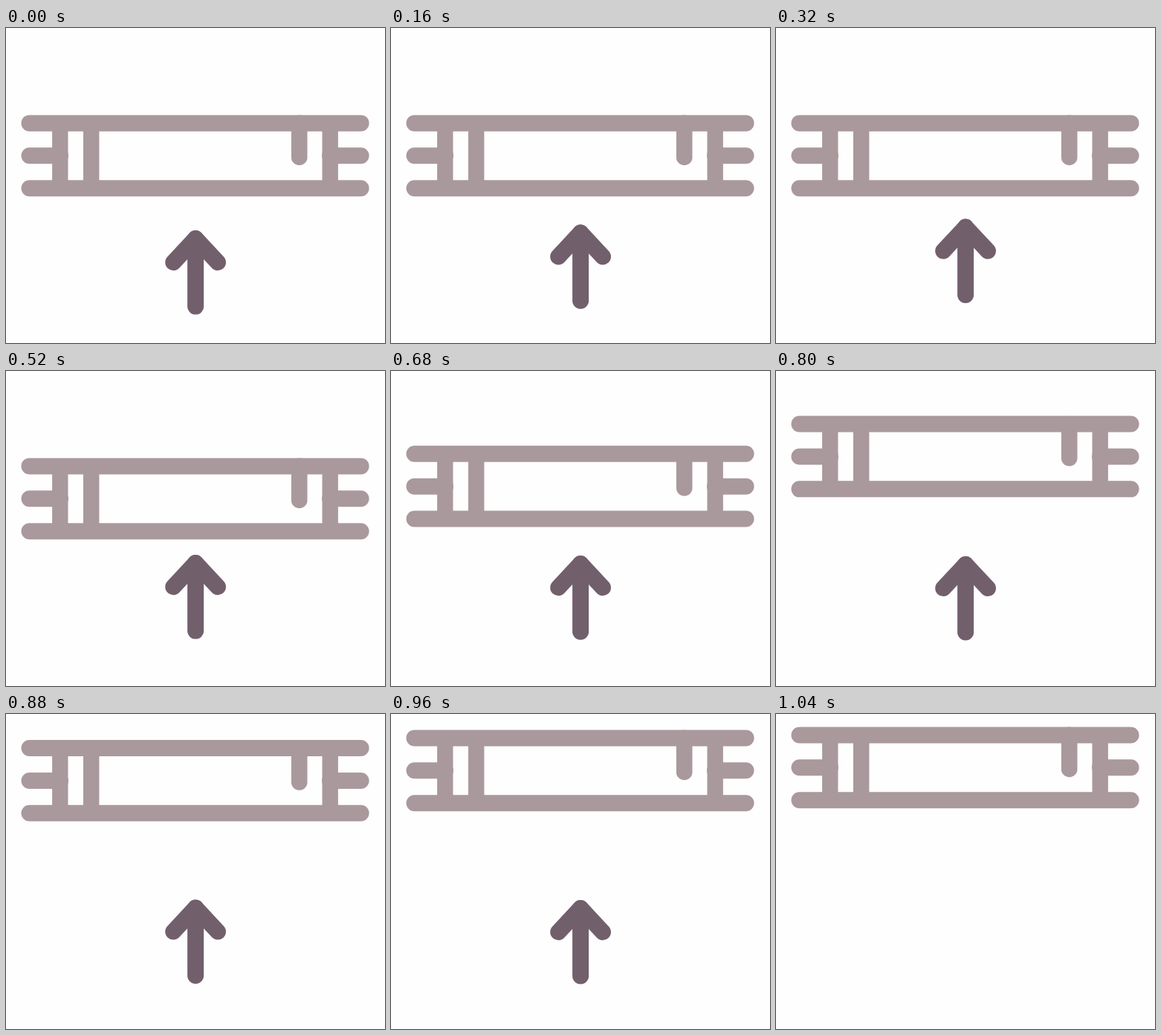
Animation, 510 px wide and 425 px high, one loop 1.08 s. Source, as an HTML page with a canvas:

```html
<!DOCTYPE html>
<html lang="en">
<head>
<meta charset="utf-8">
<title>Scroll up</title>
<style>
  html, body { margin: 0; width: 100%; height: 100%; overflow: hidden; background: #fefefe; }
  canvas { display: block; }
</style>
</head>
<body>
<canvas id="stage" width="510" height="425"></canvas>
<script>
const ctx = document.getElementById('stage').getContext('2d');
const LOOP = 1080, STEP = 40;
const TURN = 520, BAR_END = 1044, ARROW_END = 1040;
const BAR = '#a9999c', ARROW = '#725f6c';

// cubic-bezier(.5, 0, .5, 1)
function ease(x) {
  if (x <= 0) return 0;
  if (x >= 1) return 1;
  let s = x;
  for (let i = 0; i < 8; i++) {
    s -= (1.5 * s * (1 - s) + s * s * s - x) / (1.5 - 3 * s + 3 * s * s);
  }
  return s * s * (3 - 2 * s);
}

function stroke(points, width = 22, cap = 'round') {
  ctx.lineWidth = width;
  ctx.lineCap = cap;
  ctx.lineJoin = 'round';
  ctx.beginPath();
  points.forEach(([x, y]) => ctx.lineTo(x, y));
  ctx.stroke();
}

function drawBars(dy) {
  ctx.save();
  ctx.translate(0, dy);
  ctx.strokeStyle = BAR;
  const left = 31.5, right = 477.6, top = 128.4, mid = 172.3, bottom = 216.2;
  stroke([[left, top], [right, top]]);
  stroke([[left, bottom], [right, bottom]]);
  stroke([[left, mid], [73, mid]]);
  stroke([[436, mid], [right, mid]]);
  for (const x of [72.8, 114.7, 436.2]) stroke([[x, top], [x, bottom]], 21.4, 'butt');
  stroke([[394.7, top], [394.7, 174.4]], 21.6);
  ctx.restore();
}

function drawArrow(dy) {
  ctx.save();
  ctx.translate(0, dy);
  ctx.strokeStyle = ARROW;
  stroke([[225.2, 316.2], [255.1, 284], [285, 316.2]]);
  stroke([[255.1, 284], [255.1, 375.6]]);
  ctx.restore();
}

function arrowShift(t) {
  return t < TURN ? -25 * t / TURN : -25 + (t - TURN) * 0.0067;
}

function draw(now) {
  const t = Math.floor((now % LOOP) / STEP) * STEP;
  ctx.fillStyle = '#fefefe';
  ctx.fillRect(0, 0, 510, 425);
  drawBars(-100 * ease((t - TURN) / (BAR_END - TURN)));
  if (t < ARROW_END) drawArrow(arrowShift(t));
}

let start;
function tick(now) {
  start ??= now;
  draw(Math.max(0, now - start));
  requestAnimationFrame(tick);
}
draw(0);
requestAnimationFrame(tick);
</script>
</body>
</html>
```
